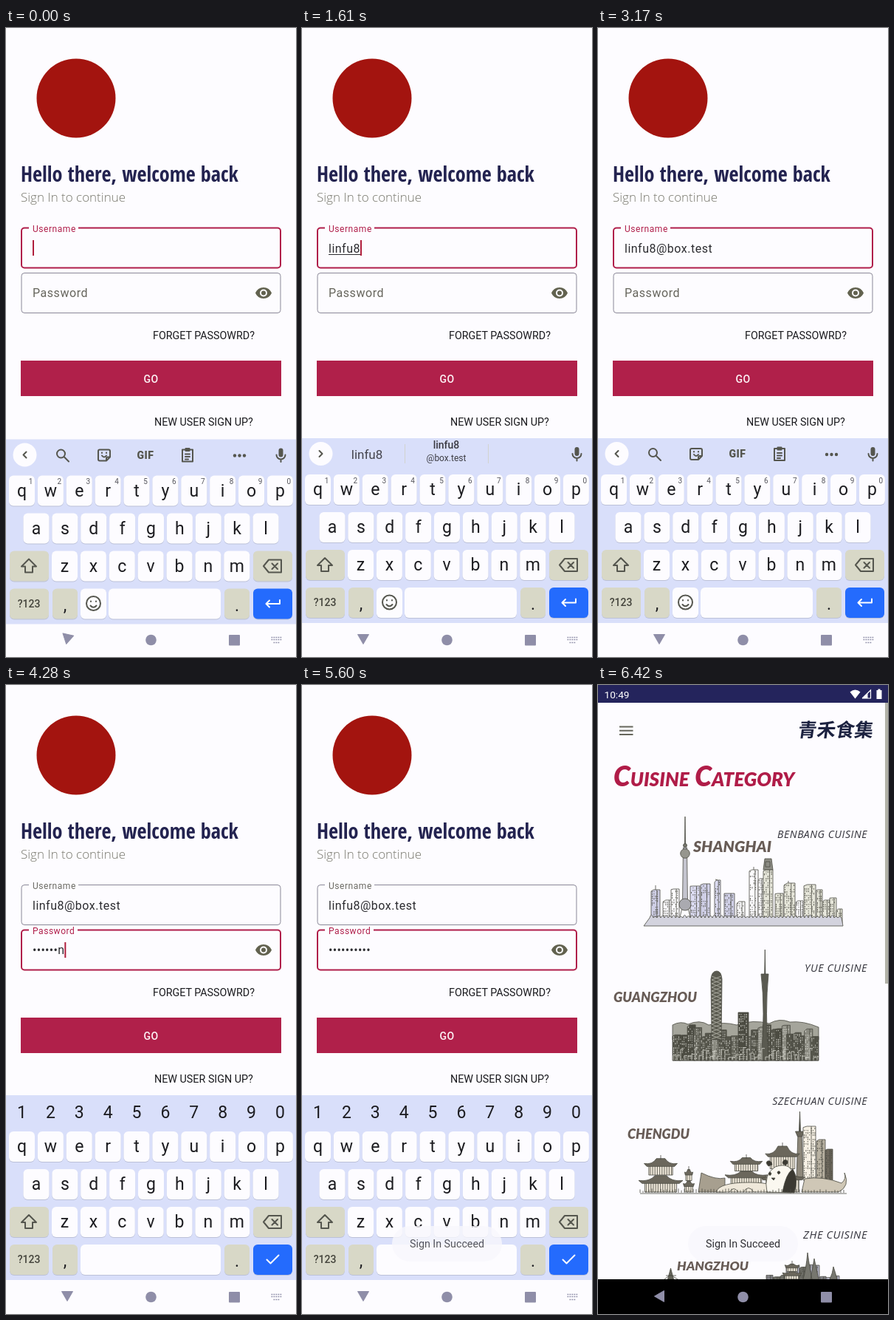
Recreate the animation shown at these times as an HTML page. Size 393 by 851 pixels, loop 6480 ms.

```html
<!DOCTYPE html>
<html lang="en">
<head>
<meta charset="utf-8">
<title>Sign in</title>
<style>
html, body { margin: 0; width: 100%; height: 100%; overflow: hidden; background: #fdfcff; }
svg { display: block; width: 393px; height: 851px; font-family: Roboto, "Noto Sans", sans-serif; }
.mid { text-anchor: middle; }
.end { text-anchor: end; }
.line { fill: none; stroke: #55564e; stroke-width: 2; stroke-linecap: round; stroke-linejoin: round; }
.input { font-size: 16px; letter-spacing: .5px; fill: #2c2c30; }
.key { font-size: 23px; text-anchor: middle; fill: #1c1c20; }
.hint { font-size: 10px; text-anchor: middle; fill: #55555c; }
.hello { font-family: "Open Sans Condensed", "Roboto Condensed", "Open Sans", sans-serif; font-stretch: condensed; font-weight: 700; fill: #232350; }
.sub { font-family: "Open Sans", sans-serif; font-weight: 300; fill: #77776c; }
.title { font-family: Lato, "Open Sans", sans-serif; font-weight: 900; font-style: italic; font-variant: small-caps; fill: #b01c48; }
.city { font-family: Lato, "Open Sans", sans-serif; font-weight: 900; font-style: italic; fill: #685c56; }
.dish { font-family: "Open Sans", sans-serif; font-weight: 400; font-style: italic; letter-spacing: .04em; fill: #34343c; }
.brand { font-family: "Noto Sans CJK SC", "Noto Sans CJK", sans-serif; font-weight: 700; fill: #1c2240; }
.sketch { stroke: #4b4b42; stroke-width: .8; stroke-linejoin: round; }
</style>
</head>
<body>
<svg id="stage" viewBox="0 0 393 851">
  <defs><clipPath id="window"><rect width="393" height="804"/></clipPath></defs>

  <g id="login">
    <rect width="393" height="851" fill="#fdfcff"/>
    <circle cx="95" cy="95" r="53.5" fill="#a3140f"/>
    <text class="hello" x="20" y="208" data-w="295">Hello there, welcome back</text>
    <text class="sub" x="20" y="235" data-w="142">Sign In to continue</text>

    <rect id="userBox" x="21" y="270.5" width="351" height="54" rx="4" fill="none"/>
    <rect x="31" y="267" width="67" height="7" fill="#fdfcff"/>
    <text id="userLabel" x="36" y="275.5" font-size="12" letter-spacing=".55">Username</text>
    <text id="user" class="input" x="36" y="304"></text>

    <rect id="passBox" x="21" y="331.5" width="351" height="54" rx="4" fill="none"/>
    <rect id="passGap" x="31" y="328" height="7" fill="#fdfcff"/>
    <text id="passLabel" x="36" letter-spacing=".55">Password</text>
    <text id="pass" class="input" x="36" y="364" style="letter-spacing:.3px"></text>
    <path transform="translate(337 346.5)" fill="#62624f" d="M12 4.5C7 4.5 2.7 7.6 1 12c1.7 4.4 6 7.5 11 7.5s9.3-3.1 11-7.5c-1.7-4.4-6-7.5-11-7.5zM12 17a5 5 0 1 1 0-10 5 5 0 0 1 0 10zm0-8a3 3 0 1 0 0 6 3 3 0 0 0 0-6z"/>
    <rect id="under" x="36" y="306" height="1" fill="#2c2c30"/>
    <rect id="caret" width="2" height="21" fill="#b01e3c"/>

    <text x="199" y="421" data-w="138" fill="#1a1a1e">FORGET PASSOWRD?</text>
    <rect x="20" y="450" width="353" height="48" fill="#b0204a"/>
    <text class="mid" x="196.5" y="479.5" font-size="14" font-weight="500" letter-spacing=".4" fill="#fdf3f6">GO</text>
    <text x="201" y="537.5" data-w="134" fill="#1a1a1e">NEW USER SIGN UP?</text>

    <g id="board">
      <rect y="555" width="393" height="250" fill="#d9dffa"/>
      <g id="tools">
        <circle cx="25.5" cy="576" r="16" fill="#fdfcff"/>
        <path class="line" d="M27.5 572l-4 4 4 4"/>
        <path class="line" d="M80 574.5a5.5 5.5 0 1 1-11 0 5.5 5.5 0 0 1 11 0zM79 579l6 6"/>
        <path class="line" stroke-width="1.8" d="M127 569h12q2 0 2 2v8l-5 5h-9q-2 0-2-2v-11q0-2 2-2zM141 579h-3q-2 0-2 2v3M130 577q3 4 6 0M130 573v.4M136 573v.4"/>
        <text class="mid" x="189" y="581" font-size="14" font-weight="900" letter-spacing=".6" fill="#55564e">GIF</text>
        <path class="line" d="M240 569h13v16h-14v-16zM243 575h6M243 578.5h6M243 582h4"/>
        <rect x="242.5" y="566.5" width="7" height="5" rx="1" fill="#55564e"/>
        <g fill="#55564e"><circle cx="310" cy="577" r="2.2"/><circle cx="316.500" cy="577" r="2.2"/><circle cx="323" cy="577" r="2.2"/></g>
      </g>
      <g id="suggest">
        <circle cx="25.500" cy="576" r="16" fill="#fdfcff"/>
        <path class="line" d="M23.500 572l4 4-4 4"/>
        <text id="typed" class="mid" x="88" y="583" font-size="17" fill="#44444c"></text>
        <path d="M139.500 563v26M252.500 563v26" stroke="#d2d3cf"/>
        <g id="chip" class="mid" fill="#3c3c44">
          <text id="chipName" x="195.500" y="569" font-size="14" font-weight="500"></text>
          <text id="chipHost" x="195.500" y="586" font-size="12"></text>
        </g>
      </g>
      <g id="mic">
        <rect x="369.500" y="567" width="6" height="12" rx="3" fill="#55564e"/>
        <path class="line" stroke-width="1.800" d="M366.500 576a6 6 0 0 0 12 0M372.500 582.500v3"/>
      </g>
      <g id="digits"></g>
      <g id="keys"></g>
      <path class="line" d="M31 717l-10 10h5v8h10v-8h5z"/>
      <path class="line" d="M356 718h17v17h-17l-7-8.500zM360.500 723l7.500 7.500M368 723l-7.500 7.500"/>
      <text class="mid" x="31" y="782" font-size="14" font-weight="500" fill="#44443c">?123</text>
      <text class="key" x="80" y="787" font-size="20">,</text>
      <text class="key" x="313" y="787" font-size="20">.</text>
      <g id="emoji">
        <rect x="101" y="758" width="35" height="41" rx="6" fill="#bcc1d8"/>
        <rect x="101" y="757" width="35" height="41" rx="6" fill="#fdfcff"/>
        <path class="line" d="M128 777a9.500 9.500 0 1 1-19 0 9.500 9.500 0 0 1 19 0zM114.500 780q4 4.500 8 0M115 774v.4M122 774v.4"/>
      </g>
      <path id="enter" class="line" style="stroke:#fff"/>
    </g>
    <path d="M359.500 824.500h15M359.500 827.500h15M362.500 831.500h9" stroke="#8f8ea8" stroke-width="1.600" stroke-dasharray="1.800 1.200"/>
  </g>

  <rect id="dim" width="393" height="851" fill="#c2c2b6"/>
  <g id="page">
    <g id="sheet">
      <rect width="393" height="804" fill="#fdfcff"/>
      <rect width="393" height="24" fill="#24245c"/>
      <rect y="804" width="393" height="47"/>
      <path d="M29 56.500h18.500M29 61.700h18.500M29 67h18.500" stroke="#66665c" stroke-width="1.900"/>
      <text class="brand" transform="translate(270 70) skewX(-8)" data-w="102">青禾食集</text>
      <text class="title" x="21" y="137" data-w="244">Cuisine Category</text>
      <g id="cities" clip-path="url(#window)"></g>
      <rect x="389" y="24" width="4" height="380" fill="#b2b2a8"/>
    </g>
    <rect y="821" width="393" height="30"/>
    <g id="status" fill="#fff">
      <text x="8.500" y="17.500" data-w="34">10:49</text>
      <path d="M341.500 9.500q7-6 14 0l-7 9z"/>
      <path d="M358.500 18v-.500L369.500 7v11z" fill="none" stroke="#fff" stroke-width="1.200"/>
      <path d="M358.500 18l7-7v7z"/>
      <path d="M379.500 5.500h3v1.500h2v12h-7V7h2z"/>
    </g>
  </g>

  <g id="nav" fill="#8f8ea8">
    <path id="back" d="M-7.500-6.500h15L0 6.500z" stroke="#8f8ea8" stroke-linejoin="round"/>
    <circle cx="196.500" cy="828" r="7.300"/>
    <rect x="302" y="821" width="15" height="14.500" rx="1"/>
  </g>
  <g id="toast">
    <rect x="122" y="732" width="149" height="48" rx="24" fill="#f9f8fd"/>
    <text class="mid" x="196.500" y="761" data-w="101" fill="#303034">Sign In Succeed</text>
  </g>
</svg>
<script>
const LOOP = 6480, NAME = 'linfu8', HOST = '@box.test', SECRET = 'ricebanana';
const RED = '#b01e4a', GREY = '#8a8898';
const NAME_TIMES = [520, 700, 880, 1060, 1250, 1450], PICK = 2250, FOCUS = 3260;
const PASS_TIMES = [3560, 3680, 3780, 3890, 3990, 4100, 4220, 4400, 4540, 4700];
const MASK = 5400, OPEN = 5620;

const $ = id => document.getElementById(id);
const set = (id, attrs) => { for (const k in attrs) $(id).setAttribute(k, attrs[k]); };
const show = (id, on) => { $(id).style.display = on ? '' : 'none'; };
const ramp = (t, from, span) => Math.min(1, Math.max(0, (t - from) / span));
const count = (times, t) => times.filter(x => x <= t).length;

// Keyboard
const label = (x, y, s, cls = 'key') => `<text class="${cls}" x="${x}" y="${y}">${s}</text>`;
const cap = (x, y, w, fill = '#fdfcff') =>
  `<rect x="${x}" y="${y + 1}" width="${w}" height="41" rx="6" fill="#bcc1d8"/>
   <rect x="${x}" y="${y}" width="${w}" height="41" rx="6" fill="${fill}"/>`;
function keyboard() {
  const soft = '#d8d8c7';
  let keys = '', hints = '', digits = '';
  [['qwertyuiop', 21.5, 604], ['asdfghjkl', 41, 655], ['zxcvbnm', 79.5, 706]].forEach(([row, x0, y]) =>
    [...row].forEach((c, i) => {
      const x = x0 + i * 38.88;
      keys += cap(x - 17.5, y, 35) + label(x, y + 28, c);
    }));
  [...'1234567890'].forEach((c, i) => {
    const x = 21.5 + i * 38.88;
    hints += label(x + 12, 615.5, c, 'hint');
    digits += label(x, 586, c);
  });
  keys += cap(5, 706, 53, soft) + cap(335, 706, 53, soft) + cap(5, 757, 53, soft) + cap(63, 757, 34, soft)
    + cap(296, 757, 34, soft) + cap(335, 757, 53, '#246bfd')
    + `<g id="space">${cap(139, 757, 152)}</g><g id="wide">${cap(101, 757, 190)}</g>`;
  $('keys').innerHTML = keys + `<g id="hints">${hints}</g>`;
  $('digits').innerHTML = digits;
}

// Skylines
let seed = 11;
const rnd = () => (seed = seed * 16807 % 2147483647) / 2147483647;
const pick = list => list[Math.floor(rnd() * list.length)];
const path = (d, fill = 'none') => `<path d="${d}" fill="${fill}"/>`;

function block(x, w, top, base, fills, ink = '#4b4b42') {
  let d = '';
  for (let y = top + 2; y < base - 2; y += 3)
    for (let c = x + 1.5; c < x + w - 1; c += 2.4)
      if (rnd() < .62) d += `M${c} ${y}v${(1 + rnd() * 1.6).toFixed(1)}`;
  const side = x + w * .65;
  return path(`M${x} ${base}V${top + rnd() * 3}L${x + w * .3} ${top}H${x + w}V${base}z`, pick(fills))
    + `<g stroke="${ink}">${path(d)}</g>` + path(`M${side} ${base}V${top}`);
}

function roof(cx, y, w, h) {
  return path(`M${cx - w / 2} ${y - 3}Q${cx - w * .25} ${y - 1} ${cx - w * .13} ${y - h}H${cx + w * .13}`
    + `Q${cx + w * .25} ${y - 1} ${cx + w / 2} ${y - 3}L${cx + w * .42} ${y + 1}H${cx - w * .42}z`, '#6b675c');
}

function pagoda(cx, top, base, w, tiers) {
  const h = (base - top) / tiers;
  let s = '';
  for (let i = 0; i < tiers; i++) {
    const wide = w * (.5 + .5 * (i + 1) / tiers), y = top + i * h + h * .45, half = wide * .36;
    let posts = '';
    for (let x = cx - half + 2; x < cx + half; x += 3.2) posts += `M${x} ${y}V${top + (i + 1) * h}`;
    s += path(`M${cx - half} ${y}h${half * 2}V${top + (i + 1) * h}h${-half * 2}z`, '#efe8da') + path(posts) + roof(cx, y, wide, h * .42);
  }
  return s + path(`M${cx} ${top + 2}v-6`);
}

function shanghai() {
  const base = 326, fills = ['#fdfcff', '#dcdcf2', '#cfcfe6', '#e6e6da'];
  const plots = [[72, 12, 277], [88, 13, 291], [99, 11, 276], [125, 13, 272], [139, 13, 269], [158, 8, 264],
    [171, 14, 282], [188, 11, 293], [205, 12, 250], [217, 8, 262], [240, 11, 282], [252, 15, 268],
    [268, 10, 292], [279, 16, 270], [296, 8, 277], [304, 10, 291], [314, 9, 288], [323, 8, 303]];
  let s = plots.map(([x, w, top]) => block(x, w, top, base - 4, fills)).join('');
  s += block(224, 13, 250, base - 4, fills) + path('M224 250l2-15h9l2 15zM227 246v-7h6v7z', '#8c8c84');
  s += path('M78 277v-6M162 264l-3-1M211 250v-4M258 268v-3');
  s += path('M117.500 218L118 178l.500 40z', '#4b4b42') + path('M115.500 220h5l1 78h-7zM115 298l-6 24M121 298l6 24', '#c5c5cf');
  s += '<circle cx="118" cy="228" r="6.300" fill="#96968e"/><circle cx="118" cy="297" r="8" fill="#aaaab0"/><circle cx="118" cy="217" r="2.500" fill="#77776e"/>';
  let trees = 'M62 326L70 315';
  for (let x = 70; x < 330; x += 5) trees += `q2.500 ${-3 - rnd() * 5} 5 0`;
  return s + path(trees + 'L332 326z', '#d3d3de');
}

function guangzhou() {
  const base = 508, dark = ['#4c4c42', '#64645a', '#8a8a80', '#55554b'];
  let s = path('M101 468V460Q112 454 122 459Q138 452 150 460Q170 455 188 460Q210 452 232 458Q246 450 260 456Q278 454 299 463V480H101z', '#a5a59b');
  for (let x = 101; x < 293; x += 6 + rnd() * 5) s += block(x, Math.min(11, 299 - x), 459 + rnd() * 18, base, dark, '#eeeee6');
  s += block(190, 14, 443, base, dark, '#eeeee6');
  s += path('M154 470L153 398Q154 387 161 387Q167 387 168 398L167 480H154z', '#5a5a50');
  let mesh = '';
  for (let y = 394; y < 476; y += 5) mesh += `M154 ${y}l13 5M167 ${y}l-13 5`;
  s += `<g stroke="#b9b9ae">${path(mesh)}</g>`;
  s += path('M225.700 391L226.300 358l.600 33z', '#44443a') + path('M221 391h10Q226 440 231 508H221Q227 440 221 391z', '#5a5a50');
  let low = '';
  for (let x = 102; x < 298; x += 5) low += `M${x} ${base}v${-4 - rnd() * 14}h4`;
  return s + `<g stroke="#d9d9d0">${path(low)}</g>` + path('M101 508h198');
}

function chengdu() {
  const base = 688, tan = ['#f6f0e4', '#e4dccb', '#b9b2a2'];
  let s = path('M272.500 604L273.500 577l1 27z', '#4b4b42') + path('M271 606h5l2 60h-9z', '#8d877a') + path('M267.500 604h12l-3 7h-6z', '#6b675c');
  s += block(278, 17, 597, base - 18, tan) + block(296, 12, 615, base - 18, tan) + block(308, 10, 628, base - 18, ['#6c675c']);
  s += pagoda(250, 623, 686, 62, 2) + pagoda(85, 640, 686, 60, 2) + pagoda(123, 655, 686, 15, 2);
  s += path('M136 686L140 660Q160 670 172 667V686z', '#a79f8f') + pagoda(201, 639, 676, 58, 2);
  s += path('M160 686Q164 673 205 673T240 686zM178 686q6-9 12 0M197 686q7-11 14 0', '#efe8da');
  s += path('M276 686L280 668Q305 664 330 674Q337 668 334 660Q342 678 326 686z', '#cfc7b6');
  s += path('M229 686Q224 662 240 652Q262 644 266 666Q270 680 262 687z', '#fbf8f0');
  s += path('M250 686Q255 660 264 655Q272 668 266 687zM231 651q-5-5-1-7 5-1 6 5zM250 647q1-6 6-4 3 4-2 7zM231 661q2-4 4 0-2 5-4 0zM243 659q3-3 4 1-3 4-4-1zM235 667h5l-2 3z', '#3b3932');
  let ground = '';
  for (let x = 57; x < 336; x += 4) ground += `M${x} 687v${-2 - rnd() * 4}`;
  return s + path(ground + 'M57 688H337');
}

function hangzhou() {
  const base = 830, fills = ['#8a8a90', '#b5b5c6', '#6f6f68'];
  let s = path('M98.500 789l-4 15h8z', '#66665c') + path('M92 799h14M90 804l8-6 10 6');
  for (let x = 228; x < 322; x += 9) s += block(x, 9, 798 - (x > 250 && x < 300 ? 14 : 0) + rnd() * 4, base, fills);
  return s + path('M278 804Q282 790 284 768Q287 790 290 804zM288 804Q291 788 293 776Q296 790 299 804zM314 804Q318 796 319 787Q322 796 324 804z', '#77776f')
    + pagoda(263, 783, 804, 26, 2);
}

function cityPage() {
  const rows = [[129, 226, 106, 'SHANGHAI', 206.5, 122, 'BENBANG'], [21, 429, 113, 'GUANGZHOU', 388, 85, 'YUE'],
    [40, 614, 84, 'CHENGDU', 568, 129, 'SZECHUAN'], [107, 792, 97, 'HANGZHOU', 749, 87, 'ZHE']];
  $('cities').innerHTML = `<g class="sketch">${shanghai() + guangzhou() + chengdu() + hangzhou()}</g>`
    + rows.map(([x, y, w, city, y2, w2, dish]) =>
      `<text class="city" x="${x}" y="${y}" data-w="${w}">${city}</text>
       <text class="dish end" x="365" y="${y2}" data-w="${w2}">${dish} CUISINE</text>`).join('');
}

// Chooses the font size that gives a line its length
function sizeText() {
  document.querySelectorAll('[data-w]').forEach(el => {
    el.style.fontSize = '20px';
    el.style.fontSize = 20 * el.dataset.w / el.getComputedTextLength() + 'px';
  });
}

function fields(t) {
  const inPass = t >= FOCUS, typing = t >= NAME_TIMES[0] && t < PICK;
  const n = count(NAME_TIMES, t), p = count(PASS_TIMES, t);
  const user = t >= PICK ? NAME + HOST : NAME.slice(0, n);
  const masked = t >= MASK ? p : Math.max(0, p - 1);
  $('user').textContent = user;
  $('pass').textContent = '•'.repeat(masked) + SECRET.slice(masked, p);
  set('userBox', { stroke: inPass ? GREY : RED, 'stroke-width': inPass ? 1 : 2 });
  set('passBox', { stroke: inPass ? RED : GREY, 'stroke-width': inPass ? 2 : 1 });
  set('userLabel', { fill: inPass ? '#6b6a63' : RED });
  const up = ramp(t, FOCUS, 150);
  set('passLabel', { y: 364 - 27 * up, 'font-size': 16 - 4 * up, fill: inPass ? RED : '#66655c' });
  set('passGap', { width: 66 * up });

  const events = [0, ...NAME_TIMES, PICK, FOCUS, ...PASS_TIMES];
  const last = events[count(events, t) - 1];
  const textW = id => $(id).textContent ? $(id).getComputedTextLength() : 0;
  show('caret', Math.floor((t - last) / 500) % 2 === 0);
  set('caret', { x: 36 + textW(inPass ? 'pass' : 'user'), y: inPass ? 348 : 287 });
  set('under', { width: typing ? textW('user') : 0 });

  show('tools', !inPass && !typing);
  show('suggest', typing);
  show('chip', n === NAME.length);
  $('typed').textContent = user;
  for (const id of ['mic', 'hints', 'emoji', 'space']) show(id, !inPass);
  for (const id of ['digits', 'wide']) show(id, inPass);
  set('enter', { d: inPass ? 'M353.500 777.500l5 5 11-11' : 'M371 772.500v5h-18M357 773l-4.500 4.500 4.500 4.500' });
}

function draw(t) {
  fields(t);
  const settle = 1 - ramp(t, 0, 90);
  set('board', { transform: `translate(0 ${1.5 * settle})` });

  const rest = (1 - ramp(t, OPEN, 250)) ** 3, scale = 1 - .035 * rest, shown = ramp(t, OPEN, 50);
  show('page', shown > 0);
  set('page', { opacity: shown });
  set('dim', { opacity: shown });
  set('sheet', { transform: `translate(196.500 402) scale(${scale}) translate(-196.500 -402)` });
  set('status', { transform: `translate(0 ${-11 * rest})` });
  const turn = t < OPEN ? 12 * settle : 90 * (1 - (1 - ramp(t, OPEN, 120)) ** 3);
  set('back', { transform: `translate(83 827) rotate(${turn})` });
  set('toast', { opacity: ramp(t, 5500, 125) });
}

keyboard();
cityPage();
$('chipName').textContent = NAME;
$('chipHost').textContent = HOST;
sizeText();
draw(0);
let start;
requestAnimationFrame(function tick(now) {
  start ??= now;
  draw((now - start) % LOOP);
  requestAnimationFrame(tick);
});
</script>
</body>
</html>
```
